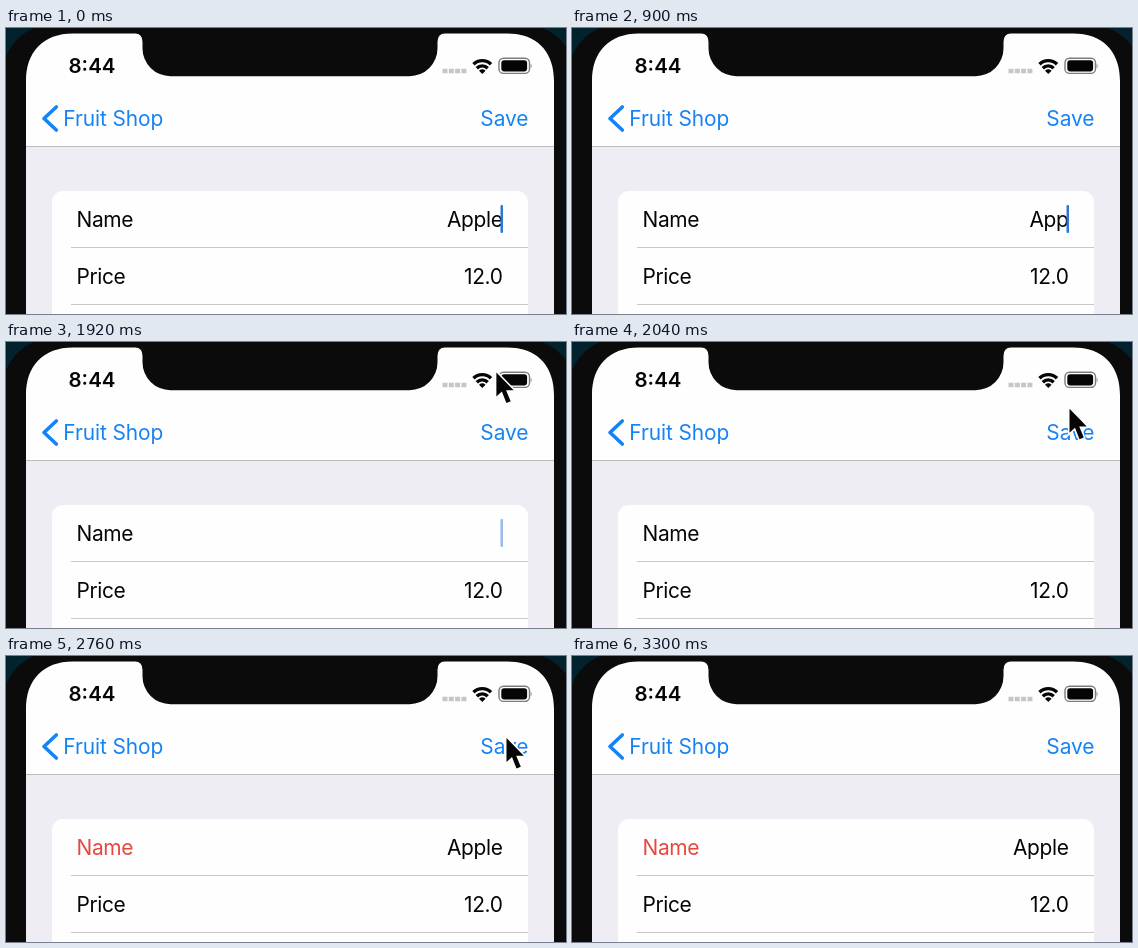
These frames come from a looping animation (560 by 286 pixels, 3.48 s). An HTML page:

```html
<!DOCTYPE html>
<html lang="en">
<head>
<meta charset="utf-8">
<title>Edit form</title>
<style>
  html, body { margin: 0; width: 100%; height: 100%; overflow: hidden; background: #0b0b0b; }
  svg { display: block; width: 560px; height: 286px; }
  text { font: 20.9px Inter, Roboto, sans-serif; letter-spacing: -.35px; fill: #050505; }
  .end { text-anchor: end; }
  .blue { fill: #1683f4; letter-spacing: -.1px; }
  .clock { font-size: 20.5px; font-weight: 600; letter-spacing: 0; }
  .line { fill: none; stroke: #c9c9cb; }
</style>
</head>
<body>
<svg viewBox="0 0 560 286">
  <!-- phone body and screen -->
  <rect width="560" height="286" fill="#0b0b0b"/>
  <path fill="#02232d" d="M0 0H28Q9 8 0 28ZM536 0Q550 5 560 18V0Z"/>
  <path fill="#fefefe" d="M20 286V53C20 24 37 5.5 67 5.5H129Q136.5 5.5 136.5 14V20A28 28 0 0 0 164.5 48.2H403.5A28 28 0 0 0 431.5 20V14Q431.5 5.5 439 5.5H501C531 5.5 548 24 548 53V286Z"/>

  <!-- status bar -->
  <text class="clock" x="62.5" y="45.3">8:44</text>
  <path stroke="#c6c6c6" stroke-width="4.5" stroke-dasharray="5 1.3" d="M436.5 43H460.5"/>
  <g fill="none" stroke="#050505" stroke-width="3.4">
    <path d="M467.5 36.3A12.3 12.3 0 0 1 485 36.3"/>
    <path d="M470.8 40.2A7.6 7.6 0 0 1 481.7 40.2"/>
  </g>
  <path d="M476.3 46L473 42.7Q476.3 40 479.6 42.7Z" fill="#050505"/>
  <rect x="493" y="30.2" width="30.5" height="15.2" rx="4.5" fill="none" stroke="#7c7c7c" stroke-width="1.4"/>
  <rect x="495.3" y="32.3" width="25.8" height="11.1" rx="2.8" fill="#050505"/>
  <path d="M524.7 35.5Q526.6 38 524.7 40.5Z" fill="#7c7c7c"/>

  <!-- navigation bar -->
  <path d="M50.3 79L38 90.5L50.3 102" fill="none" stroke="#1683f4" stroke-width="3.6"
    stroke-linecap="round" stroke-linejoin="round"/>
  <text class="blue" x="57.3" y="98">Fruit Shop</text>
  <text class="blue end" id="save" x="522.3" y="98">Save</text>

  <!-- form -->
  <path fill="#eeedf3" d="M20 119H548V286H20Z"/>
  <path class="line" style="stroke:#bcbcbf" d="M20 118.5H548"/>
  <rect x="46" y="163" width="476" height="160" rx="11" fill="#fefefe"/>
  <path class="line" d="M65 219.5H522M65 276.5H522"/>
  <text id="label" x="70.5" y="199">Name</text>
  <text class="end" id="value" x="496.5" y="199"></text>
  <text x="70.5" y="255.5">Price</text>
  <text class="end" x="496.5" y="255.5">12.0</text>
  <rect id="caret" x="494.5" y="177" width="2.5" height="28" rx="1" fill="#2f77d6"/>

  <path id="pointer" d="M0 0V24L5.5 19L10 30.5L14.3 28.7L9.7 17.7H17.3Z"
    fill="#050505" stroke="#fff" stroke-width="3" paint-order="stroke"/>
</svg>
<script>
const LOOP = 3480, TICK = 60, PRESS = 2340, SAVED = 2400;
const $ = id => document.getElementById(id);

// Progress from 0 to 1 between two times.
const ramp = (t, from, to) => Math.min(1, Math.max(0, (t - from) / (to - from)));

// Opacity that fades out and back in between two times.
const blink = (t, from, to) => Math.abs(1 - 2 * ramp(t, from, to));

// One letter is deleted every 180 ms, starting at 660 ms.
function typed(t) {
  if (t >= SAVED) return "Apple";
  const deleted = Math.floor(5 * ramp(t, 480, 1380));
  return "Apple".slice(0, 5 - deleted);
}

function draw(now) {
  const t = Math.floor(now % LOOP / TICK) * TICK;
  const saved = t >= SAVED;
  $("value").textContent = typed(t);
  $("label").style.fill = saved ? "#e4483f" : "";
  $("caret").setAttribute("opacity", saved ? 0 : blink(t, 0, 450) * blink(t, 1800, 2280));

  const dim = t < PRESS ? 0 : 1 - ramp(t, SAVED, 2760);
  $("save").setAttribute("opacity", 1 - .63 * dim);

  // The pointer slows down onto the button, then speeds away again.
  const near = 1 - (1 - ramp(t, 1800, 2280)) ** 3 - ramp(t, 2940, 3300) ** 2;
  $("pointer").setAttribute("transform", `translate(${476.5 + 24 * near} ${-40 + 122 * near})`);
}

const start = performance.now();
function frame() {
  draw(performance.now() - start);
  requestAnimationFrame(frame);
}
frame();
</script>
</body>
</html>
```
